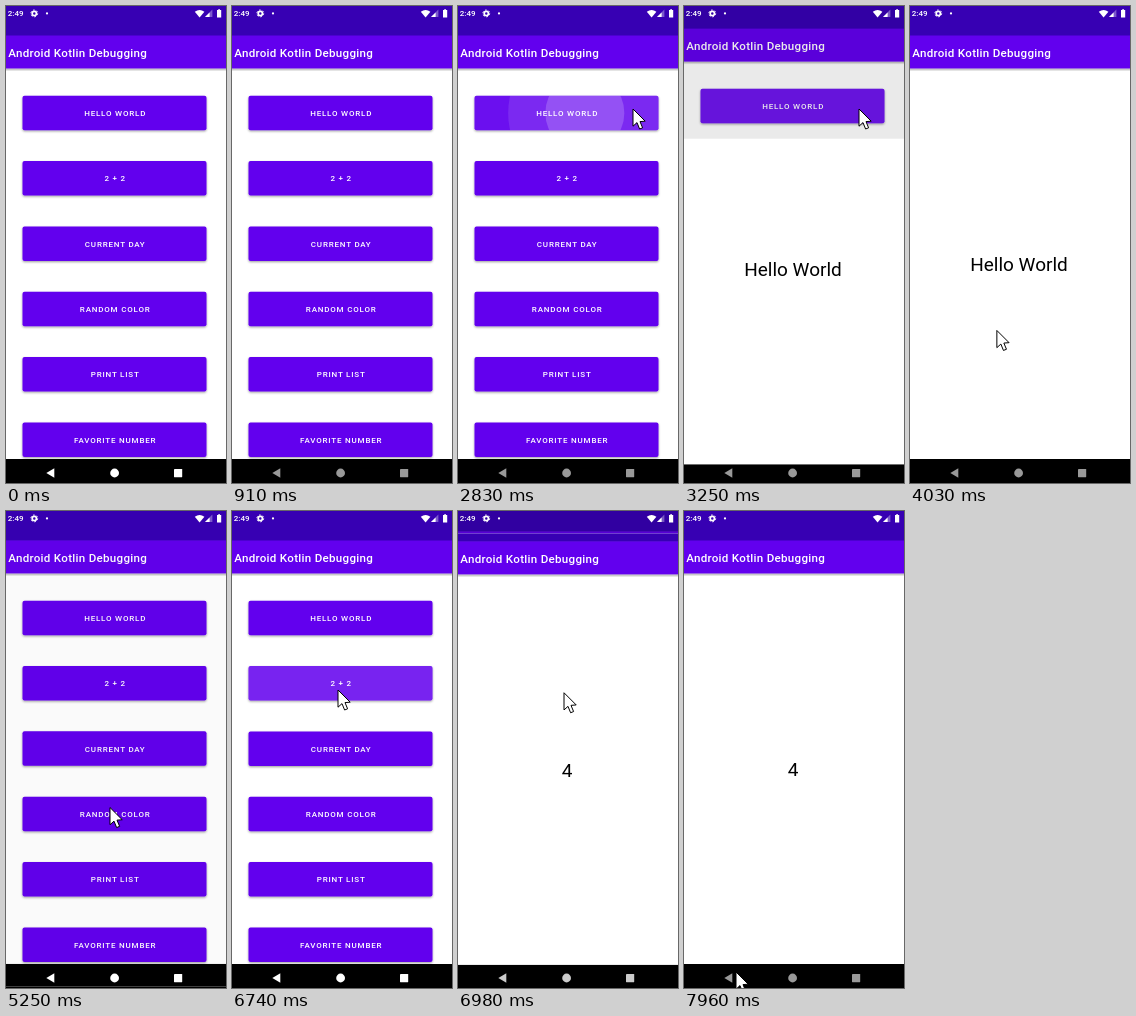
An HTML page for the animation above (8 s loop, 220 by 477 pixels).

```html
<!DOCTYPE html>
<html lang="en">
<head>
<meta charset="utf-8">
<title>Debugging demo</title>
<style>
  html, body { margin: 0; width: 100%; height: 100%; overflow: hidden; background: #000; }
  svg { display: block; width: 220px; height: 477px; }
  text { font-family: Roboto, sans-serif; }
  .title { font-size: 11.6px; font-weight: 500; letter-spacing: .28px; fill: #fff; }
  .label { font-size: 8px; font-weight: 500; letter-spacing: .8px; fill: #fff; text-anchor: middle; }
  .answer { font-size: 19px; text-anchor: middle; }
  .clock { font-size: 8px; font-weight: 500; fill: #fff; }
</style>
</head>
<body>
<svg viewBox="0 0 220 477">
  <defs>
    <linearGradient id="barShade" x2="0" y2="1">
      <stop offset="0" stop-color="#000" stop-opacity=".32"/>
      <stop offset="1" stop-color="#000" stop-opacity="0"/>
    </linearGradient>
    <filter id="raise" x="-5%" y="-20%" width="110%" height="150%">
      <feDropShadow dx="0" dy="1.1" stdDeviation=".8" flood-opacity=".38"/>
    </filter>
    <clipPath id="reveal"><rect id="revealBox" width="220" height="477"/></clipPath>
    <clipPath id="press"><rect id="pressBox" x="16.5" width="184" height="34.5" rx="2"/></clipPath>
    <g id="frame">
      <rect width="220" height="477" fill="#fff"/>
      <rect y="62.5" width="220" height="3" fill="url(#barShade)"/>
      <rect width="220" height="30" fill="#3700b3"/>
      <rect y="29.5" width="220" height="33" fill="#6200ee"/>
      <text class="title" x="2.3" y="51">Android Kotlin Debugging</text>
      <rect y="453" width="220" height="24"/>
    </g>
  </defs>

  <g id="home">
    <use href="#frame"/>
    <g id="buttons"></g>
    <g id="ripple" clip-path="url(#press)" fill="#fff">
      <rect id="wash" x="16" width="185" height="36"/>
      <circle id="outer"/>
      <circle id="inner"/>
    </g>
    <g id="labels"></g>
    <rect id="dim" width="220" height="477"/>
  </g>

  <g clip-path="url(#reveal)">
    <g id="detail">
      <use href="#frame"/>
      <text id="answer" class="answer" x="109" y="265"></text>
    </g>
  </g>

  <g fill="#fff">
    <text class="clock" x="1.8" y="10.4">2:49</text>
    <circle cx="28.3" cy="7.4" r="2.1" fill="none" stroke="#fff" stroke-width="1.7"/>
    <circle cx="28.3" cy="7.4" r="3.4" fill="none" stroke="#fff" stroke-width="1" stroke-dasharray="1.78"/>
    <circle cx="41" cy="7.4" r="1.1"/>
    <path d="M188.8 5.8Q193.6 2 198.4 5.8L193.6 11.4Z"/>
    <path d="M199 11L206.4 3.6V11Z" opacity=".35"/>
    <path d="M199 11L203.6 6.4V11Z"/>
    <path d="M211 4H212.2V3.2H214V4H215.2V11.4H211Z"/>
  </g>

  <rect id="navPress" x="16" y="453" width="58" height="28" rx="13" fill="#fff"/>
  <g id="nav" fill="#fff">
    <path d="M40.3 467L48.3 462.3V471.7Z"/>
    <circle cx="108.6" cy="467" r="4.4"/>
    <rect x="168" y="463" width="8.2" height="8.2" rx=".4"/>
  </g>
  <path id="cursor" d="M0 0V17.2L4 13.6L6.6 20L9.6 18.8L7 12.6L12.2 12.2Z"
        fill="#fff" stroke="#000" stroke-width="1" stroke-linejoin="round"/>
</svg>

<script>
const LOOP = 8000, H = 477, SLIDE = 425;
const PRESS_1 = 2830, PRESS_2 = 6440, BACK = 4720, CLOSE = 4907, OPEN_DELAY = 325;
const $ = id => document.getElementById(id);
const set = (id, attrs) => {
  for (const k in attrs) $(id).setAttribute(k, attrs[k]);
};
const clamp = v => Math.max(0, Math.min(1, v));
const span = (t, a, b) => clamp((t - a) / (b - a));
const mix = (a, b, p) => a + (b - a) * p;

const rowY = i => 89.7 + i * 65.35;
const names = ['HELLO WORLD', '2 + 2', 'CURRENT DAY', 'RANDOM COLOR', 'PRINT LIST', 'FAVORITE NUMBER'];
names.forEach((name, i) => {
  $('buttons').innerHTML +=
    `<rect x="16.5" y="${rowY(i)}" width="184" height="34.5" rx="2" fill="#6200ee" filter="url(#raise)"/>`;
  $('labels').innerHTML +=
    `<text class="label" x="109.2" y="${rowY(i) + 20.3}">${name}</text>`;
});

// Two joined Bezier pieces: quick start, very long settle.
function bezier(x, x0, y0, x1, y1, x2, y2, x3, y3) {
  const at = (s, a, b, c, d) =>
    a * (1 - s) ** 3 + 3 * b * s * (1 - s) ** 2 + 3 * c * s * s * (1 - s) + d * s ** 3;
  let lo = 0, hi = 1;
  for (let i = 0; i < 24; i++) {
    const mid = (lo + hi) / 2;
    if (at(mid, x0, x1, x2, x3) < x) lo = mid; else hi = mid;
  }
  return at(lo, y0, y1, y2, y3);
}
function settle(x) {
  if (x <= 0) return 0;
  if (x >= 1) return 1;
  return x < 1 / 6
    ? bezier(x, 0, 0, .05, 0, .1333, .06, 1 / 6, .4)
    : bezier(x, 1 / 6, .4, .2083, .82, .25, 1, 1, 1);
}

// Pointer stops: time, x, y
const stops = [
  [2230, 201, 106], [2430, 175, 103], [3740, 175, 103], [4030, 87, 324], [4440, 52, 462],
  [4970, 52, 462], [5250, 104, 297], [5520, 106, 193], [5590, 106, 193], [5770, 106, 181],
  [5900, 106, 181], [6010, 106, 179], [6780, 106, 179], [7100, 106, 183], [7200, 106, 183],
  [7960, 52, 461], [8000, 52, 461]
];
function slope(i, k) {
  if (i < 1 || i > stops.length - 2) return 0;
  const [a, b, c] = [stops[i - 1], stops[i], stops[i + 1]];
  const l = (b[k] - a[k]) / (b[0] - a[0]), r = (c[k] - b[k]) / (c[0] - b[0]);
  return l * r > 0 ? 2 * l * r / (l + r) : 0;
}
function pointer(t, k) {
  let i = 0;
  while (i < stops.length - 2 && t >= stops[i + 1][0]) i++;
  const a = stops[i], b = stops[i + 1], d = b[0] - a[0], s = span(t, a[0], b[0]);
  return mix(a[k], b[k], s * s * (3 - 2 * s))
    + d * s * (1 - s) * (slope(i, k) * (1 - s) - slope(i + 1, k) * s);
}

function drawRipple(t) {
  const second = t >= PRESS_2, age = t - (second ? PRESS_2 : PRESS_1);
  const on = age >= 0 && age < 620;
  set('ripple', { visibility: on ? 'visible' : 'hidden' });
  if (!on) return;
  const y = rowY(second ? 1 : 0), cy = y + 17.25;
  const cx = second ? 108.5 : mix(127, 108.5, span(age, 0, 120));
  const fade = mix(1, .4, span(age, 0, 280)) * (1 - span(age, 320, 600));
  set('pressBox', { y });
  set('wash', { y: y - .5, opacity: .06 * fade });
  set('outer', { cx, cy, r: 76 + age * .7, opacity: .11 * fade });
  set('inner', { cx, cy, r: 39 + age * .5, opacity: .19 * fade });
}

function drawScreens(t) {
  const second = t >= PRESS_2;
  let homeY = 0, dim = 0, detailY = 0, top = H;
  if (t >= CLOSE && !second) {
    const s = (t - CLOSE) / SLIDE, p = settle(s);
    homeY = -9.5 * (1 - p);
    dim = .1 * clamp(1.1 * (1 - s));
    detailY = 19.5 * p;
    top = H * settle(s + .035);
  } else {
    const age = t - (second ? PRESS_2 : PRESS_1) - OPEN_DELAY, p = settle(age / SLIDE);
    homeY = -9.5 * p;
    dim = .1 * clamp(age / 117);
    detailY = 19.5 * (1 - p);
    top = H * (1 - p);
  }
  set('home', { transform: `translate(0 ${homeY})` });
  set('dim', { opacity: dim });
  set('detail', { transform: `translate(0 ${detailY})`, visibility: top < H ? 'visible' : 'hidden' });
  set('revealBox', { y: top });
  $('answer').textContent = second ? '4' : 'Hello World';
}

function drawNav(t) {
  const bright = t < BACK ? 1 - span(t, 100, 910)
    : span(t, BACK, BACK + 150) * (1 - span(t, 6760, 7190));
  set('nav', { opacity: mix(.6, 1, bright) });
  const grow = span(t, BACK, BACK + 130), w = 58 * grow;
  set('navPress', {
    x: 45 - w / 2, width: w,
    opacity: t < BACK ? 0 : .14 * (1 - span(t, 4980, 5200))
  });
}

function draw(t) {
  drawRipple(t);
  drawScreens(t);
  drawNav(t);
  set('cursor', {
    transform: `translate(${pointer(t, 1)} ${pointer(t, 2)})`,
    visibility: t >= stops[0][0] ? 'visible' : 'hidden'
  });
}

const start = performance.now();
function tick() {
  draw((performance.now() - start) % LOOP);
  requestAnimationFrame(tick);
}
tick();
</script>
</body>
</html>
```
